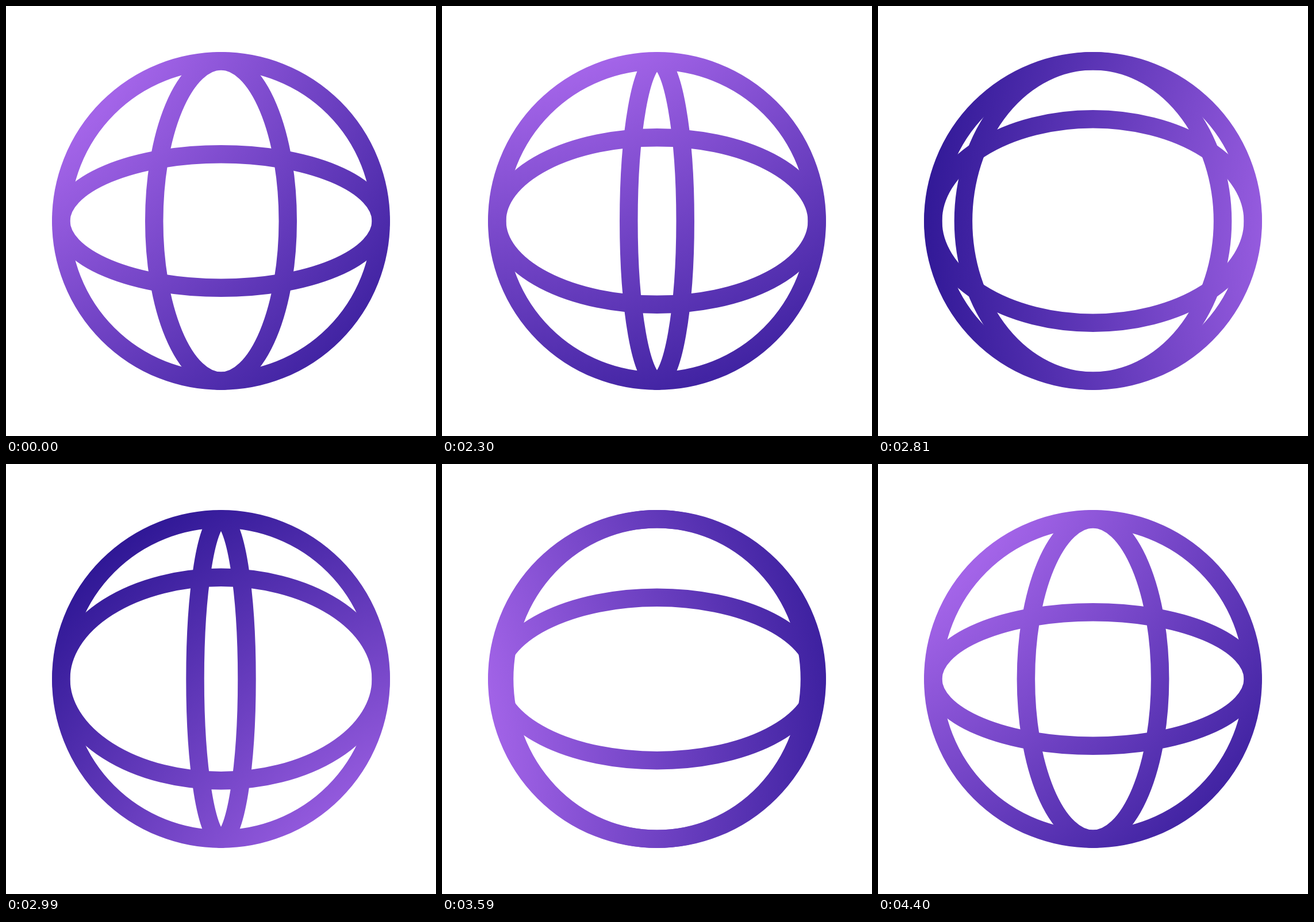
Write an HTML page with a canvas that moves like this. It is 748 px wide and 748 px high and loops after 4.43 s.

```html
<!DOCTYPE html>
<html lang="en">
<head>
<meta charset="utf-8">
<title>Turning globe</title>
<style>
  html, body { margin: 0; width: 100%; height: 100%; overflow: hidden; background: #fff; }
  canvas { display: block; width: 748px; height: 748px; }
</style>
</head>
<body>
<canvas id="stage" width="748" height="748"></canvas>
<script>
const ctx = document.getElementById('stage').getContext('2d');
const LOOP = 4430, START = 2000, STEP = 30;
const C = 374, R = 278.25, LINE = 31.5;
const RAD = Math.PI / 180;

// Tracks: [time ms, value, slope per ms]
const spin = [
  [2000, 0, 0.008], [2510, 79.4, 0.215], [2990, 195.4, 0.245],
  [3260, 258.5, 0.215], [3920, 341, 0.065], [4430, 360, 0]
];
const tilt = [
  [2000, 116.3, 0], [2510, 168, 0.05], [2880, 177.5, 0],
  [3260, 168.5, -0.048], [3920, 120, -0.017], [4430, 116.3, 0]
];
const shade = [
  [2000, 43, 0], [2510, 106, 0.2], [2990, 230, 0.248],
  [3260, 291, 0.21], [3920, 387, 0.065], [4430, 403, 0]
];

// Cubic Hermite interpolation along a track
function at(track, t) {
  let i = 0;
  while (i < track.length - 2 && t >= track[i + 1][0]) i++;
  const [t0, a, ma] = track[i], [t1, b, mb] = track[i + 1];
  const d = t1 - t0, u = (t - t0) / d, v = 1 - u;
  return a + (b - a) * u * u * (3 - 2 * u) + d * u * v * (ma * v - mb * u);
}

// Wide radial gradient whose light centre lies far outside the globe
function paint(deg) {
  const far = 900, a = deg * RAD;
  const x = C - far * Math.cos(a), y = C - far * Math.sin(a);
  const shift = 54 * Math.cos((deg - 43) * RAD);
  const g = ctx.createRadialGradient(x, y, far - 336 + shift, x, y, far + 378 + shift);
  g.addColorStop(0, 'rgb(163,100,232)');
  g.addColorStop(1, 'rgb(42,20,146)');
  return g;
}

function ring(rx, ry) {
  ctx.beginPath();
  ctx.ellipse(C, C, rx, ry, 0, 0, Math.PI * 2);
  ctx.closePath();
  ctx.stroke();
}

function draw(ms) {
  const t = START + Math.max(0, Math.floor((ms - START) / STEP) * STEP);
  ctx.fillStyle = '#fff';
  ctx.fillRect(0, 0, 748, 748);
  ctx.lineWidth = LINE;
  ctx.lineJoin = 'round';
  ctx.strokeStyle = paint(at(shade, t));
  ring(R, R);
  ring(Math.max(0.5, R * Math.abs(Math.sin((24.7 - at(spin, t)) * RAD))), R);
  ring(R, at(tilt, t));
}

const begin = performance.now();
function tick() {
  draw((performance.now() - begin) % LOOP);
  requestAnimationFrame(tick);
}
tick();
</script>
</body>
</html>
```
